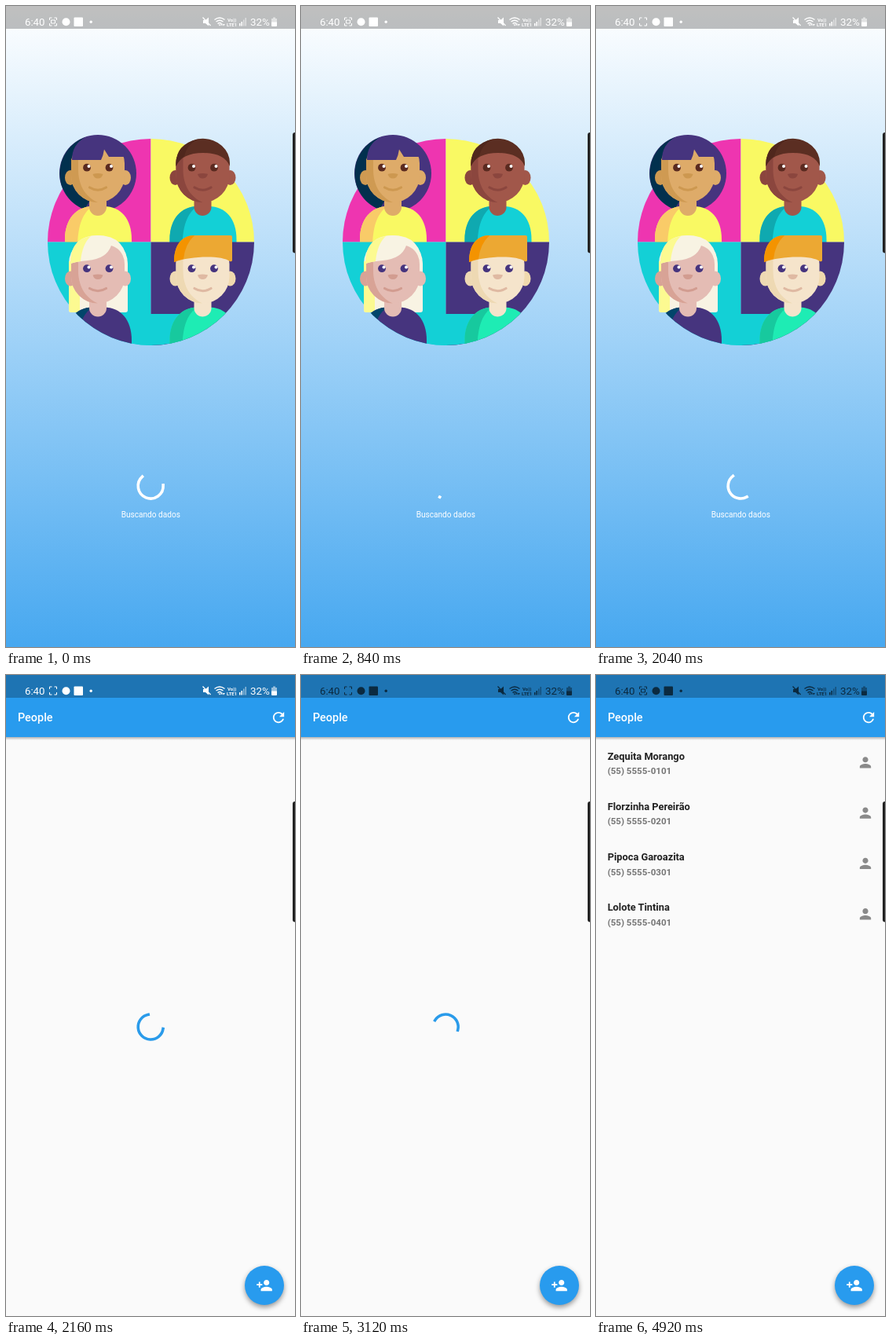
An HTML page that plays this animation: 368 px wide and 816 px high, repeating every 5160 ms.

```html
<!DOCTYPE html>
<html lang="pt">
<head>
<meta charset="utf-8">
<style>
  html, body { margin: 0; width: 100%; height: 100%; overflow: hidden; }
  svg { display: block; width: 368px; height: 816px; font-family: Roboto, sans-serif; }
  .arc { fill: none; stroke-width: 3.6; stroke-linecap: square; }
  .name { font: 700 12.8px Roboto, sans-serif; fill: #212121; }
  .phone { font: 700 11.5px Roboto, sans-serif; fill: #757575; }
  #fab { filter: drop-shadow(0 3px 3px #0006); }
</style>
</head>
<body>
<svg viewBox="0 0 368 816">
  <defs>
    <linearGradient id="sky" x2="0" y2="1">
      <stop stop-color="#fff"/><stop offset="1" stop-color="#47a8f0"/>
    </linearGradient>
    <linearGradient id="shade" x2="0" y2="1">
      <stop stop-opacity=".28"/><stop offset="1" stop-opacity="0"/>
    </linearGradient>
    <clipPath id="disc"><circle cx="184.5" cy="300.5" r="131.5"/></clipPath>
    <path id="user" d="M12 12c2.21 0 4-1.79 4-4s-1.79-4-4-4-4 1.79-4 4 1.79 4 4 4zm0 2c-2.67 0-8 1.34-8 4v2h16v-2c0-2.66-5.33-4-8-4z"/>
  </defs>

  <g id="splash">
    <rect width="368" height="816" fill="url(#sky)"/>
    <g id="art"></g>
    <path id="arc1" class="arc" stroke="#fff"/>
    <text x="184.3" y="650.5" font-size="10.1" fill="#fff" text-anchor="middle">Buscando dados</text>
  </g>

  <g id="home">
    <rect width="368" height="816" fill="#fafafa"/>
    <rect y="79" width="368" height="4" fill="url(#shade)"/>
    <rect width="368" height="79" fill="#289bee"/>
    <text x="15" y="59.3" font-size="14.4" font-weight="500" fill="#fff">People</text>
    <path transform="translate(336.3 43.3) scale(.894)" fill="#fff" d="M17.65 6.35C16.2 4.9 14.21 4 12 4c-4.42 0-7.99 3.58-7.99 8s3.57 8 7.99 8c3.73 0 6.84-2.55 7.73-6h-2.08c-.82 2.33-3.04 4-5.65 4-3.31 0-6-2.69-6-6s2.69-6 6-6c1.66 0 3.14.69 4.22 1.78L13 11h7V4z"/>
    <path id="arc2" class="arc" stroke="#2a9bea"/>
    <g id="list"></g>
    <circle id="fab" cx="329" cy="777" r="25" fill="#289bee"/>
    <g transform="translate(318.3 766.3) scale(.894)" fill="#fff">
      <use href="#user" x="3"/><path d="M6 10V7H4v3H1v2h3v3h2v-3h3v-2z"/>
    </g>
  </g>

  <rect width="368" height="29" opacity=".25"/>
  <g id="status" fill="currentColor">
    <text x="24" y="25" font-size="13.2">6:40</text>
    <path d="M55.5 18v-3h3M61.500 15h3v3M64.500 22v3h-3M58.500 25h-3v-3" fill="none" stroke="currentColor"/>
    <path id="scan" d="M57.500 18h5v4h-5z" fill="none" stroke="currentColor"/>
    <circle cx="76.500" cy="20.300" r="5"/>
    <rect x="86.500" y="14.500" width="11.500" height="11.500" rx="1"/>
    <circle cx="108.200" cy="20.300" r="1.700"/>
    <path d="M251 18h3l4-3.500v11l-4-3.500h-3z"/>
    <path d="M250.500 14.500l10 10.500" stroke="currentColor" stroke-width="1.300"/>
    <path d="M265.500 17.500q6.500-5 13 0M267.500 20q4.500-3.500 9 0M269.500 22.500q2.500-2 5 0" fill="none" stroke="currentColor" stroke-width="1.300"/>
    <path d="M270.500 23.500h3l-1.500 2zM275 22l2 2.500h-4zM277 25.500l2-2.500h-4z"/>
    <text x="282" y="19.500" font-size="6" font-weight="700">Vo))</text>
    <text x="281" y="25.500" font-size="6" font-weight="700">LTE1</text>
    <path d="M297 22h1.500v3.500H297zM299.500 20h1.500v5.500h-1.500z"/>
    <path d="M302 17.500h1.500v8H302zM304.500 15h1.500v10.500h-1.500z" opacity=".5"/>
    <text x="311" y="25" font-size="13.400">32%</text>
    <path d="M340 14.500h3V16h2v5h-7v-5h2z" opacity=".55"/>
    <path d="M338 20.500h7V25q0 1-1 1h-5q-1 0-1-1z"/>
  </g>
  <rect x="365" y="161" width="8" height="153.500" rx="3" fill="#222"/>
</svg>

<script>
const $ = id => document.getElementById(id);
const path = (d, fill) => `<path d="${d}" fill="${fill}"/>`;

// Bust centred on x = 117, shifted into its quadrant
function person(dx, dy, c) {
  const eye = x => `<circle cx="${x}" cy="205.700" r="4.900" fill="${c.eye}"/>
    <circle cx="${x + 2.5}" cy="204" r="2" fill="#fff"/>`;
  return `<g transform="translate(${dx} ${dy})">` +
    path('M75 310V297C75 271 90 255 110 255H125C146 255 160 271 160 297V310Z', c.top) +
    path('M75 310V297C75 271 90 255 110 255C97 264 91 280 91 310Z', c.topShade) +
    `<rect x="106" y="238" width="22" height="29" rx="11" fill="${c.neck || c.skin}"/>
    <ellipse cx="82" cy="218.500" rx="7" ry="9.500" fill="${c.shade}"/>
    <ellipse cx="152" cy="218.500" rx="7" ry="9.500" fill="${c.ear || c.skin}"/>` +
    path('M83 200A34 30 0 0 1 151 200V216A34 34 0 0 1 83 216Z', c.skin) +
    path('M83 195V216A34 34 0 0 0 117 250C99 242 92 226 92 208V190Z', c.shade) +
    eye(103) + eye(131.5) +
    path('M110.500 214Q117 212 123.500 214Q122 219.500 117 219.500Q112 219.500 110.500 214Z', c.line) +
    `<path d="M106.500 231Q117 237.500 127.500 231" fill="none" stroke="${c.line}" stroke-width="3.200" stroke-linecap="round"/></g>`;
}

const purple = '#46347e', cyan = '#13d0d6', yellow = '#f9f963';
const quarter = (x, y, fill) =>
  `<rect x="${x}" y="${y}" width="132" height="132" fill="${fill}" clip-path="url(#disc)"/>`;

$('art').innerHTML =
  quarter(52.5, 168.5, '#ee35b0') + quarter(184.5, 168.5, yellow) +
  `<circle cx="117" cy="213" r="49" fill="${purple}"/>` +
  path('M101 167A49 49 0 0 0 100 259L117 230L84 195Q88 176 101 167Z', '#02304e') +
  person(0, 0, { skin: '#deab69', shade: '#cf9a52', line: '#cd9850', eye: '#5a2a20', top: yellow, topShade: '#f9cb68' }) +
  path('M84 196Q84 176 101 167H133Q151 176 151 192H131L125 182.500Q124 190 121 196Z', purple) +
  person(133.5, 0, { skin: '#a1574a', shade: '#8b463e', line: '#8b463e', eye: '#5a2a20', top: cyan, topShade: '#0fa9b0' }) +
  path('M216.500 204V200A34 31 0 0 1 285 200V204Q278 187 251 187Q224 187 216.500 204Z', '#5b2e22') +
  path('M216.500 204V200Q217 176 243 170Q230 177 227 191Q219 197 216.500 204Z', '#50271d') +
  quarter(52.5, 300.5, cyan) + quarter(184.5, 300.5, purple) +
  path('M80 387V328A37.500 36 0 0 1 155 328V387Q155 390 152 390H83Q80 390 80 387Z', '#f8f3e3') +
  path('M80 387V325H94V390H83Q80 390 80 387Z', '#fcfa91') +
  '<g clip-path="url(#disc)">' + quarter(92, 392, cyan) + '</g>' +
  path('M94 384H145V390H94Z', '#f8f3e3') +
  '<g clip-path="url(#disc)">' +
  person(0, 128.5, { skin: '#e4bcb4', shade: '#d8a396', line: '#d29c90', eye: purple, top: purple, topShade: '#02456a' }) +
  person(133.5, 128.5, { skin: '#f5e4cb', shade: '#eed9b3', line: '#dfb9a2', eye: purple, ear: '#f0d9ae', top: '#1eecb4', topShade: '#17c99e' }) +
  '</g>' +
  path('M82 328Q82 292 117 292Q154 292 154.500 332Q150 310 134 305Q128 322 104 324Q90 325 82 328Z', '#f8f3e3') +
  path('M82 328Q82 297 108 293Q97 303 95 325Q88 326 82 328Z', '#fcfa91') +
  path('M214 326C214 304 224 292 240 292H286Q288 292 288 294V324Q287 326 285 325C275 317 235 318 214 326Z', '#eca833') +
  path('M214 326C214 304 224 292 240 292Q228 303 226 322Q220 323 214 326Z', '#f49300');

$('list').innerHTML = ['Zequita Morango', 'Florzinha Pereirão', 'Pipoca Garoazita', 'Lolote Tintina']
  .map((name, i) => `<g transform="translate(0 ${i * 64.3})">
    <text class="name" x="14.700" y="107.500">${name}</text>
    <text class="phone" x="14.700" y="126">(55) 5555-0${i + 1}01</text>
    <use href="#user" transform="translate(332.300 100.600) scale(.894)" fill="#8a8a8a"/></g>`).join('');

// Fast-out-slow-in: cubic-bezier(.4, 0, .2, 1)
function ease(x) {
  x = Math.min(1, Math.max(0, x));
  let lo = 0, hi = 1, t = .5;
  for (let i = 0; i < 20; i++) {
    t = (lo + hi) / 2;
    const bx = 1.2 * (1 - t) ** 2 * t + .6 * (1 - t) * t * t + t ** 3;
    if (bx < x) lo = t; else hi = t;
  }
  return 3 * (1 - t) * t * t + t ** 3;
}

// Material spinner: cycle phase, rotation in degrees, elapsed ms
function spin(el, cy, phase, turn, ms) {
  const p = (phase + ms / 1333) % 1;
  const head = ease(p * 2), tail = ease(p * 2 - 1);
  const from = -90 + tail * 270 + turn + ms / 2222 * 360 + p * 90;
  const sweep = Math.max((head - tail) * 270, .1);
  const at = deg => {
    const a = deg * Math.PI / 180;
    return `${184.2 + 16 * Math.cos(a)} ${cy + 16 * Math.sin(a)}`;
  };
  el.setAttribute('d', `M${at(from)}A16 16 0 ${+(sweep > 180)} 1 ${at(from + sweep)}`);
}

const show = (id, on) => $(id).style.display = on ? '' : 'none';
const LOOP = 5160, STEP = 120, HOME = 2160, LOADED = 3240;

function draw(now) {
  const t = Math.floor(now % LOOP / STEP) * STEP;
  show('splash', t < HOME);
  show('home', t >= HOME);
  show('arc2', t < LOADED);
  show('list', t >= LOADED);
  show('scan', t < 1200 || t >= 3600);
  $('status').style.color = t < HOME + STEP ? '#fff' : '#0b2a40';
  // The spinners run slower while the app is busy
  spin($('arc1'), 611, .29, 60, 1.1 * Math.min(t, 1320) + .5 * Math.max(t - 1320, 0));
  spin($('arc2'), 448, .34, 68, 420 * Math.min(1, Math.max(0, t - HOME) / 720));
}

const start = performance.now();
function tick() {
  draw(performance.now() - start);
  requestAnimationFrame(tick);
}
tick();
</script>
</body>
</html>
```
